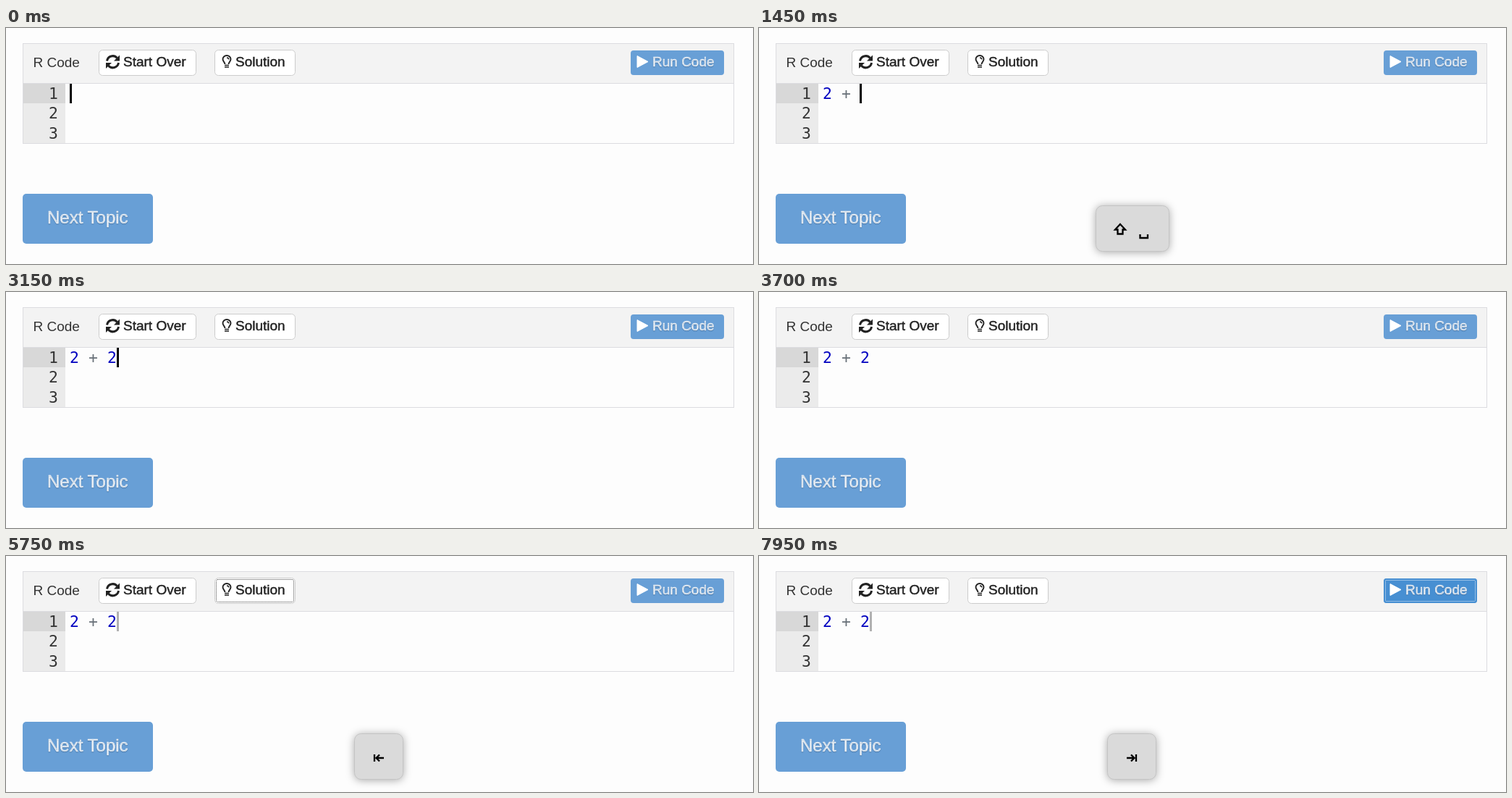
These frames come from a looping animation (1032x326 px, 8 s). An HTML page:

```html
<!DOCTYPE html>
<html lang="en">
<head>
<meta charset="utf-8">
<title>R exercise</title>
<style>
html, body { margin: 0; width: 100%; height: 100%; overflow: hidden; background: #fdfdfd; }
svg { display: block; width: 1032px; height: 326px; }
text { font: 19px "Liberation Sans", Arial, sans-serif; white-space: pre; }
.dark { fill: #333; }
.label { fill: #222; stroke: #222; stroke-width: .45; }
.light { fill: #fff; stroke: #fff; stroke-width: .45; text-shadow: 0 1px 1px #4a78a8; }
.big { font-size: 24px; }
.code text { font: 21.4px "DejaVu Sans Mono", monospace; }
.num { fill: #0000c0; }
.op { fill: #687078; }
.line { fill: none; stroke: #222; }
.btn { fill: #fff; stroke: #ccc; }
.blue { fill: #689fd6; }
.dots { fill: none; stroke-dasharray: 1 1; }
.key rect { fill: #dadada; stroke: #c4c4c4; filter: drop-shadow(0 1px 6px #0005); }
.key path { fill: none; stroke: #000; stroke-width: 2.3; }

.anim { opacity: 0; animation: 8s step-end infinite; }
.fade { opacity: 0; animation: 8s linear infinite; }
#two { animation-name: two; }
#plus { animation-name: plus; }
#last { animation-name: last; }
#run { animation-name: run; }
#solution { animation-name: solution; }
#start { animation-name: start; }
#caret { animation: move 8s step-end infinite, blink 8s step-end infinite; }
#space { animation-name: space; }
#back { animation-name: back; }
#tab { animation-name: tab; }

@keyframes two { 0% { opacity: 0 } 5%, 100% { opacity: 1 } }
@keyframes plus { 0% { opacity: 0 } 13%, 100% { opacity: 1 } }
@keyframes last { 0% { opacity: 0 } 25%, 100% { opacity: 1 } }
@keyframes run { 0%, 66% { opacity: 0 } 48%, 95%, 100% { opacity: 1 } }
@keyframes solution { 0%, 76%, 95%, 100% { opacity: 0 } 66%, 86% { opacity: 1 } }
@keyframes start { 0%, 86%, 100% { opacity: 0 } 76% { opacity: 1 } }
@keyframes move {
  0% { transform: none }
  5% { transform: translateX(13px) }
  9% { transform: translateX(26px) }
  13% { transform: translateX(39px) }
  14.5% { transform: translateX(51px) }
  25%, 100% { transform: translateX(65px) }
}
@keyframes blink {
  0%, 25%, 37.5% { opacity: 1 }
  20.75%, 31.25%, 43.75% { opacity: 0 }
  48%, 100% { opacity: .3 }
}
@keyframes space {
  0%, 14.4%, 21.2%, 100% { opacity: 0 }
  15.4%, 20% { opacity: 1 }
}
@keyframes back {
  0%, 48.5%, 57%, 66.5%, 75%, 76.5%, 83.5%, 100% { opacity: 0 }
  49.5%, 55.5%, 67.5%, 74%, 77.5%, 82% { opacity: 1 }
}
@keyframes tab {
  0%, 87%, 95%, 96.3% { opacity: 0 }
  88%, 93.5%, 97.3%, 100% { opacity: 1 }
}
</style>
</head>
<body>
<svg viewBox="0 0 1032 326">
  <!-- editor panel -->
  <rect x="23.5" y="21.5" width="982" height="138" fill="#fdfdfd" stroke="#dcdce0"/>
  <rect x="24" y="22" width="981" height="54" fill="#f3f3f3"/>
  <path d="M24 76.5H1005" stroke="#dcdce0"/>
  <rect x="24" y="77" width="58" height="82" fill="#ebebeb"/>
  <rect x="24" y="77" width="58" height="27" fill="#d8d8d8"/>

  <!-- toolbar -->
  <text class="dark" x="37.5" y="54">R Code</text>
  <rect class="btn" x="128.5" y="30.5" width="134" height="35" rx="5"/>
  <rect id="start" class="anim dots" x="130.5" y="32.5" width="130" height="31" rx="2" stroke="#444"/>
  <path class="line" d="M139.5 45.5A8 8 0 0 1 153.5 41.5M155.5 48A8 8 0 0 1 141.5 52" stroke-width="3"/>
  <path d="M157 37.5v8h-8zM138 56v-8h8z" fill="#222"/>
  <text class="label" x="162" y="53">Start Over</text>
  <rect class="btn" x="288.5" y="30.5" width="111" height="35" rx="5"/>
  <rect id="solution" class="anim dots" x="290.5" y="32.5" width="107" height="31" rx="2" stroke="#444"/>
  <g class="line">
    <path d="M302.5 50C302.5 47 299.5 46.5 299.5 43A5.5 5 0 0 1 310.500 43C310.500 46.500 307.500 47 307.500 50" stroke-width="1.9"/>
    <path d="M302 51.5h6M302 54h6M305 41q2.500 0 2.800 2.300" stroke-width="1.6"/>
  </g>
  <text class="label" x="317" y="53">Solution</text>
  <rect class="blue" x="863" y="31" width="129" height="34" rx="4"/>
  <g id="run" class="anim">
    <rect x="863" y="31" width="129" height="34" rx="4" fill="#478fd2"/>
    <rect class="dots" x="865.5" y="33.5" width="124" height="29" rx="1" stroke="#dceaf8"/>
  </g>
  <path d="M872 38.5V54.5L887 46.5Z" fill="#fff" stroke="#fff" stroke-linejoin="round"/>
  <text class="light" x="893" y="53">Run Code</text>

  <!-- code -->
  <g class="code">
    <g class="dark">
      <text x="59" y="98">1</text>
      <text x="59" y="125">2</text>
      <text x="59" y="153">3</text>
    </g>
    <text id="two" class="anim num" x="88" y="98">2</text>
    <text id="plus" class="anim op" x="114" y="98">+</text>
    <text id="last" class="anim num" x="140" y="98">2</text>
    <rect id="caret" x="88" y="77" width="3" height="27"/>
  </g>

  <rect class="blue" x="23" y="229" width="180" height="69" rx="5"/>
  <text class="light big" x="57" y="270">Next Topic</text>

  <!-- pressed keys -->
  <g id="space" class="fade key">
    <rect x="465.5" y="245.5" width="101" height="63" rx="9"/>
    <path d="M499 271L506 278.500H502.500V284.500H495.500V278.500H492Z"/>
    <path d="M526.500 285V290H537V285"/>
  </g>
  <g id="back" class="fade key">
    <rect x="481.5" y="245.5" width="67" height="63" rx="9"/>
    <path d="M509 274V284M511 279H522M516 274.500L511.500 279L516 283.500"/>
  </g>
  <g id="tab" class="fade key">
    <rect x="481.5" y="245.5" width="67" height="63" rx="9"/>
    <path d="M521 274V284M508 279H519M514 274.500L518.500 279L514 283.500"/>
  </g>
</svg>
</body>
</html>
```
